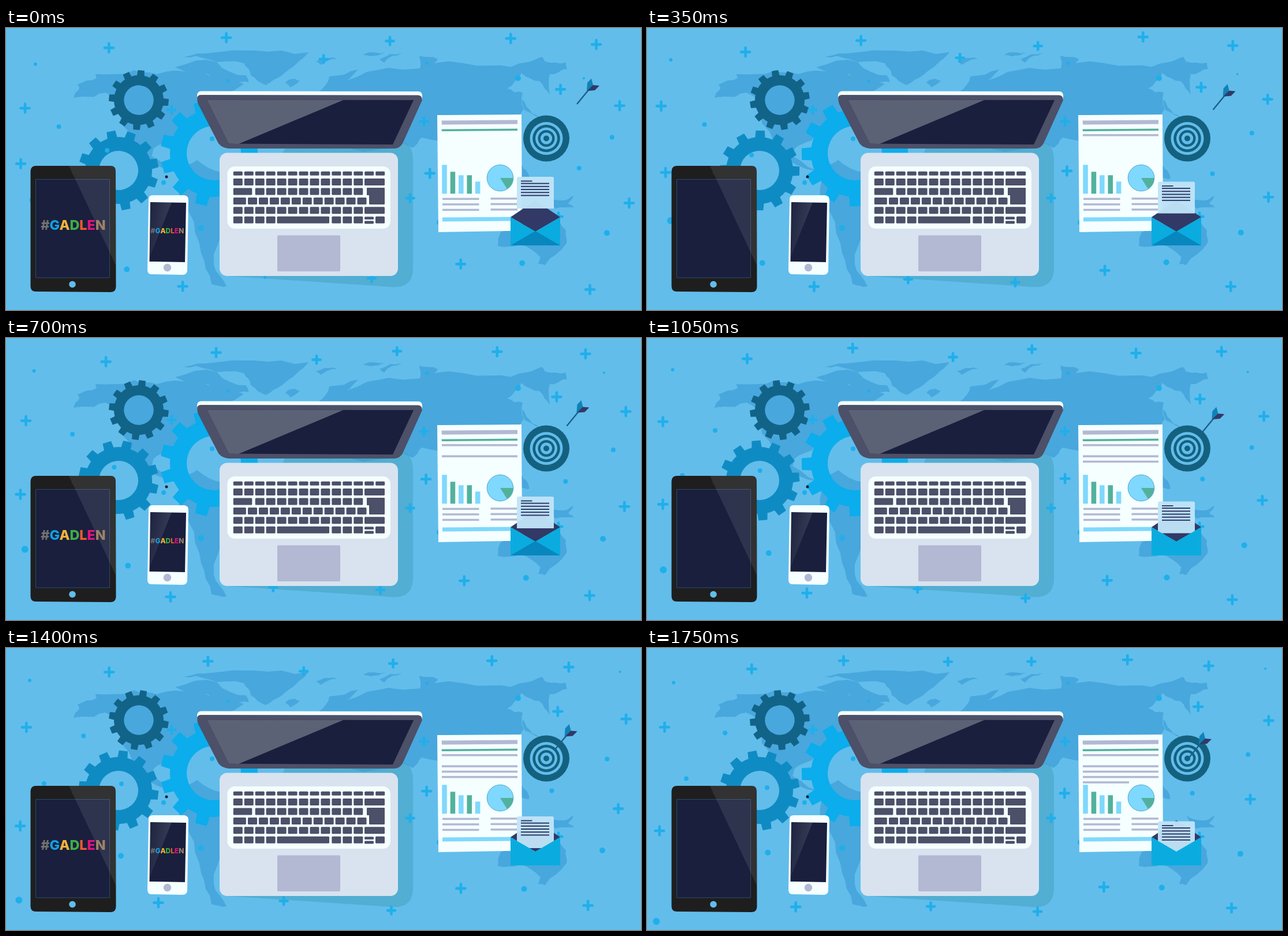
Write an HTML page that moves like this. It is 1100 by 489 pixels and loops after 2.1 s.

```html
<!DOCTYPE html>
<html lang="en">
<head>
<meta charset="utf-8">
<title>Desk with devices</title>
<style>
  html, body { margin: 0; width: 100%; height: 100%; overflow: hidden; background: #62bdeb; }
  svg { display: block; width: 100vw; height: 100vh; }
  #map { fill: #48a7dd; }
  .dot { fill: #1fafea; }
  .plus { fill: none; stroke: #1fafea; stroke-width: 4.6; stroke-linecap: round; }
  .navy { fill: #191f3c; }
  .key { fill: #4c5068; }
  .white { fill: #f5ffff; }
  .grey { fill: #b3b8d3; }
  .green { fill: #52b19c; }
  .sky { fill: #7fd8fd; }
  .ink { fill: #323966; }
  .tag { font: 800 23.4px Inter, "Open Sans", sans-serif; text-anchor: middle; }
</style>
</head>
<body>
<svg viewBox="0 0 1100 489" preserveAspectRatio="none">
  <defs>
    <linearGradient id="shine" x1="0" y1="0" x2="1" y2=".35">
      <stop offset="0" stop-color="#fff" stop-opacity=".02"/>
      <stop offset="1" stop-color="#fff" stop-opacity=".14"/>
    </linearGradient>
  </defs>

  <g id="map"></g>
  <path fill="#429fb9" fill-opacity=".5" d="M484 207H672L692 199Q706 207 705 234V418Q704 452 668 449L382 430Z"/>
  <g id="gears"></g>
  <g id="sparks"></g>

  <g id="tablet">
    <path fill="#1e1e1e" d="M52 239H181Q190 239 190 248L190.500 449Q190 458 181 458L52 457Q42.500 457 42.500 448V248Q43 239 52 239Z"/>
    <path class="navy" stroke="#2c4a70" d="M51.500 262.500H179.500V433H51.500Z"/>
    <path fill="#fff" fill-opacity=".09" d="M109 239H181Q190 239 190 248V411Z"/>
    <circle cx="115" cy="444.500" r="5.800" fill="#62bdeb"/>
    <circle cx="115" cy="251.500" r="1.200" fill="#343434"/>
  </g>
  <g id="phone">
    <path class="white" d="M254 290L309 290Q316 291 316 298L314 421Q313 428 306 428L251 427Q245 426 245 419L247 297Q247 290 254 290Z"/>
    <path class="navy" d="M250 302L312 303 310 406 248.500 405Z"/>
    <path fill="url(#shine)" d="M250 302H287L249 397Z"/>
    <circle class="grey" cx="279.500" cy="415.500" r="6.700"/>
  </g>
  <g id="tags"></g>

  <g id="laptop">
    <path class="white" d="M331 124V116Q332 109.500 338 109.500L714 110Q721 110 721 118V124Z"/>
    <path class="key" d="M331 121Q332 116 338 116L714 116.500Q721 117 721 125L688 198Q683 209 673 209L386 209Q374 208 368 200L333 132Q331 126 331 121Z"/>
    <path class="navy" d="M348 124.500L706 125 670 202 386 200.500Z"/>
    <path fill="#5c6276" d="M348 124.500L584 125 403 201 386 200.500Z"/>
    <rect x="370" y="216.500" width="309" height="213.500" rx="13" fill="#d8e3ef"/>
    <rect class="white" x="383.500" y="240" width="282.500" height="108" rx="13"/>
    <rect class="grey" x="470" y="359.500" width="109" height="62.500" rx="2"/>
    <g id="keys" class="key">
      <path d="M626 277H655Q656 277 656 278V305Q656 306 655 306H630Q629 306 629 305V290H626Q625 290 625 289V278Q625 277 626 277Z"/>
    </g>
  </g>

  <g id="report">
    <path class="white" d="M747 151L893 150 894 351.500 749 354Z"/>
    <path class="grey" d="M754.500 160.500L886 159.500V166.500L755 167.500Z"/>
    <path class="green" d="M754.500 175.500L886 174.500V178L755 179Z"/>
    <path class="sky" d="M756 328.500L886 327.500V334.500L756 335.500Z"/>
    <circle class="sky" cx="856" cy="260" r="22.800" stroke="#4da7cf"/>
    <path class="green" d="M856 260H878.500A22.800 22.800 0 0 1 868 279Z"/>
    <g id="lines"></g>
  </g>

  <g id="target"></g>
  <g id="arrow">
    <path d="M989 132L1016 99" fill="none" stroke="#1b5f86" stroke-width="2.400"/>
    <path fill="#0f82b8" d="M1006 109L1007 95 1014 87.500 1017 99Z"/>
    <path class="ink" d="M1007 109L1017 99 1028 100 1020 108Z"/>
  </g>

  <g id="mail">
    <path class="ink" d="M874 328L917 299 960 328 917 353Z"/>
    <g id="letter">
      <path fill="#c0e4f8" fill-opacity=".96" d="M888 258H946Q949 258 949 261V313H885V261Q885 258 888 258Z"/>
    </g>
    <path fill="#0aacdf" d="M874 328L917 353 960 328V377H874Z"/>
    <path id="fold" fill="#0787be" d="M874 377L917 352 960 377Z"/>
  </g>
</svg>

<script>
const NS = 'http://www.w3.org/2000/svg';
const STEP = 350, STEPS = 6;
const $ = id => document.getElementById(id);
const movers = [];

function add(parent, name, attrs) {
  const el = document.createElementNS(NS, name);
  for (const key in attrs) el.setAttribute(key, attrs[key]);
  parent.appendChild(el);
  return el;
}
const rect = (parent, x, y, width, height, cls = '', rx = 0) =>
  add(parent, 'rect', { x, y, width, height, rx, class: cls });
const place = (el, x, y) => el.setAttribute('transform', `translate(${x} ${y})`);
const show = (el, on) => { el.style.display = on ? '' : 'none'; };

// Seeded noise in -1..1
let seed = 7;
function noise() {
  seed = (seed * 16807) % 2147483647;
  return seed / 1073741823.5 - 1;
}

// Land: a few corner points, with the coast roughened between them
function land(outline) {
  let pts = outline.split(' ').map(p => p.split(',').map(Number));
  for (let pass = 0; pass < 2; pass++) {
    pts = pts.flatMap(([x, y], i) => {
      const [u, v] = pts[(i + 1) % pts.length];
      const bend = noise() * .11;
      return [[x, y], [(x + u) / 2 + (y - v) * bend, (y + v) / 2 + (u - x) * bend]];
    });
  }
  add($('map'), 'path', { d: 'M' + pts.map(p => p.map(n => n.toFixed(1)).join(' ')).join('L') + 'Z' });
}
land('117,121 127,105 124,98 157,87 155,80 222,73 262,80 322,72 412,97 350,140 285,195 257,208 252,222 310,252 245,230 199,165 200,130 172,112 131,119');
land('308,50 356,43 430,39 524,42 503,62 478,82 450,99 424,82 412,61 350,54');
land('293,68 365,59 416,82 421,94 390,96 350,80');
land('484,94 498,88 509,91 492,103');
land('537,57 556,52 573,54 545,64');
land('619,46 657,43 632,49');
land('647,54 686,43 655,60');
land('542,110 560,84 610,72 590,91 663,69 717,70 716,48 748,54 742,61 842,65 905,59 928,50 934,58 970,60 972,71 942,80 942,116 924,92 893,78 868,105 895,112 897,140 845,210 775,212 720,190 704,208 688,201 650,210 530,205');
land('894,124 902,137 924,155 899,143');
land('893,238 902,248 906,262 893,260');
land('302,246 331,229 375,250 405,272 377,345 360,410 382,448 356,444 338,390 317,320 300,292');
land('852,378 857,354 905,326 941,332 950,320 970,351 971,373 934,411 922,409 926,398 890,376');
land('934,290 967,299 983,291 974,304 984,311 952,313');

// Gears: twelve teeth and a round hole
function gear(x, y, outer, root, hole, fill, from, turn) {
  const pt = (r, deg) => {
    const a = (deg - 90) * Math.PI / 180;
    return `${(r * Math.cos(a)).toFixed(2)} ${(r * Math.sin(a)).toFixed(2)}`;
  };
  let d = '';
  for (let a = 0; a < 360; a += 30) {
    d += `${a ? 'L' : 'M'}${pt(root, a - 8.5)}L${pt(outer, a - 6.3)}L${pt(outer, a + 6.3)}L${pt(root, a + 8.5)}`;
    d += `A${root} ${root} 0 0 1 ${pt(root, a + 21.5)}`;
  }
  d += `ZM${hole} 0A${hole} ${hole} 0 1 0 ${-hole} 0A${hole} ${hole} 0 1 0 ${hole} 0Z`;
  const el = add($('gears'), 'path', { d, fill, 'fill-rule': 'evenodd' });
  movers.push(k => el.setAttribute('transform', `translate(${x} ${y}) rotate(${from + turn * k})`));
}
gear(360, 217, 92.5, 76, 47, '#0badec', 14, 15);
gear(195, 247, 69.5, 58, 34, '#0f8bc3', -11, 12);
gear(230, 125, 52, 43, 25.7, '#126388', 4.5, 16.2);

// Dots and plus signs float around a home point, some with a steady drift
function float(el, x, y, vx = 0, vy = 0, sway = 7) {
  const jitter = Array.from({ length: STEPS }, () => [noise() * sway, noise() * sway]);
  movers.push(k => {
    const t = k - (STEPS - 1) / 2;
    place(el, x + vx * t + jitter[k][0], y + vy * t + jitter[k][1]);
  });
}
const dot = (r, ...path) => float(add($('sparks'), 'circle', { r, class: 'dot' }), ...path);
const plus = (r, ...path) =>
  float(add($('sparks'), 'path', { d: `M${-r} 0H${r}M0 ${-r}V${r}`, class: 'plus' }), ...path);

plus(7.5, 177, 40);
plus(7.5, 356, 23, -8);
plus(6.5, 530, 40, -6, -4);
plus(6.5, 671, 26);
plus(7.5, 852, 22, -9);
plus(7.5, 996, 27, -10, 2);
plus(7.5, 960, 108);
plus(7.5, 1070, 130);
plus(7.5, 31, 140);
plus(7.5, 24, 275, -2, 18);
plus(7.5, 1064, 286, -5, -8);
plus(7.5, 792, 416);
plus(7.5, 1011, 450);
plus(7.5, 280, 447, -8);
plus(7.5, 729, 250);
plus(6.5, 470, 437, 8, 4);
plus(6.5, 650, 445, 8, 6);
for (const [x, y] of [[287, 142], [724, 162], [700, 295], [957, 327]]) plus(6.5, x, y, 0, 0, 0);

dot(3, 47, 58);
dot(4, 114, 158, 9, -5);
dot(4, 192, 228, 6, 6, 2);
dot(5, 205, 385, -1, -12);
dot(2, 1039, 62, 14, -10);
dot(4, 1046, 187);
dot(4, 965, 249, -10, 2);
dot(5, 1034, 355);
dot(5, 895, 413);
dot(4, 62, 243, 3, -6, 3);
dot(6, 31, 385, -6, 35, 2);
for (const [r, x, y] of [[4, 357, 192], [5, 887, 87], [5, 338, 347], [5, 751, 337], [4, 273, 268], [3, 729, 61], [2.5, 384, 92]])
  dot(r, x, y, 0, 0, 0);
add($('sparks'), 'circle', { cx: 278, cy: 258, r: 2.5, class: 'navy' });

// Blinking tag on both screens
const tints = ['#71716f', '#129fe0', '#f3b43a', '#3fae4a', '#f15a2d', '#e3127e', '#9c8266'];
function tag(x, y, scale) {
  const el = add($('tags'), 'text', { class: 'tag', transform: `translate(${x} ${y}) scale(${scale})` });
  [...'#GADLEN'].forEach((ch, i) => { add(el, 'tspan', { fill: tints[i] }).textContent = ch; });
}
tag(116.5, 350, 1);
tag(279.5, 356, .51);
movers.push(k => show($('tags'), k % 2 === 0));

// Keyboard
const LEFT = 393.8, PITCH = 18.95;
const rowY = n => 261 + n * 16.45;
const key = (x, y, w = 16, h = 12) => rect($('keys'), x, y, w, h, '', 1.5);
function row(first, last, y, h, left = LEFT) {
  for (let i = first; i <= last; i++) key(left + i * PITCH, y, 16, h);
}
row(0, 13, 248.7, 7);
row(0, 11, rowY(0));
key(621, rowY(0), 35);
key(LEFT, rowY(1), 32.5);
row(2, 11, rowY(1));
key(LEFT, rowY(2), 22);
row(0, 10, rowY(2), 12, 419);
row(0, 11, rowY(3));
key(621, rowY(3), 35);
row(0, 3, rowY(4));
key(469.5, rowY(4), 90.5);
row(9, 11, rowY(4));
key(621, 327.3, 16, 4.8);
key(621, 334.6, 16, 4.8);
key(640, rowY(4));

// Report: bar chart, fixed rules, then one more rule per step
const lines = $('lines');
[50, 38, 32, 32, 21].forEach((h, i) =>
  rect(lines, 755.3 + i * 14.4, 287.3 - h, 8.5, h, i % 2 ? 'green' : 'sky'));
for (let i = 0; i < 3; i++) {
  rect(lines, 756, 294.6 + i * 9.5, 63.5, 3.5, 'grey');
  rect(lines, 839.5, 294.1 + i * 9.5, 46.5, 3.5, 'grey');
}
for (let n = 1; n < STEPS; n++) {
  const y = 184 + (n > 1 ? 10 : 0) + (n - 1) * 9.3;
  const el = rect(lines, 755, y, n < 5 ? 131 : 80, 3.6, 'grey');
  movers.push(k => show(el, k >= n));
}

// Target and approaching arrow
[40, 28.5, 23.8, 19, 14.5, 10.2, 5].forEach((r, i) =>
  add($('target'), 'circle', { cx: 936, cy: 191.5, r, fill: i % 2 ? '#62bdeb' : '#14617f' }));
movers.push(k => {
  const run = 8 * k + .4 * k * k;
  place($('arrow'), -run, run * 1.16);
});

// Letter sliding into the envelope
rect($('letter'), 892, 264.5, 19.5, 1.9, 'ink');
for (let i = 0; i < 5; i++) rect($('letter'), 892, 268.6 + i * 5.2, 49, 2, 'ink');
movers.push(k => {
  place($('letter'), 0, 8.5 * k);
  show($('fold'), k < 3);
});

let shown = -1;
function draw() {
  const k = Math.floor(performance.now() / STEP) % STEPS;
  if (k !== shown) {
    shown = k;
    movers.forEach(move => move(k));
  }
  requestAnimationFrame(draw);
}
draw();
</script>
</body>
</html>
```
